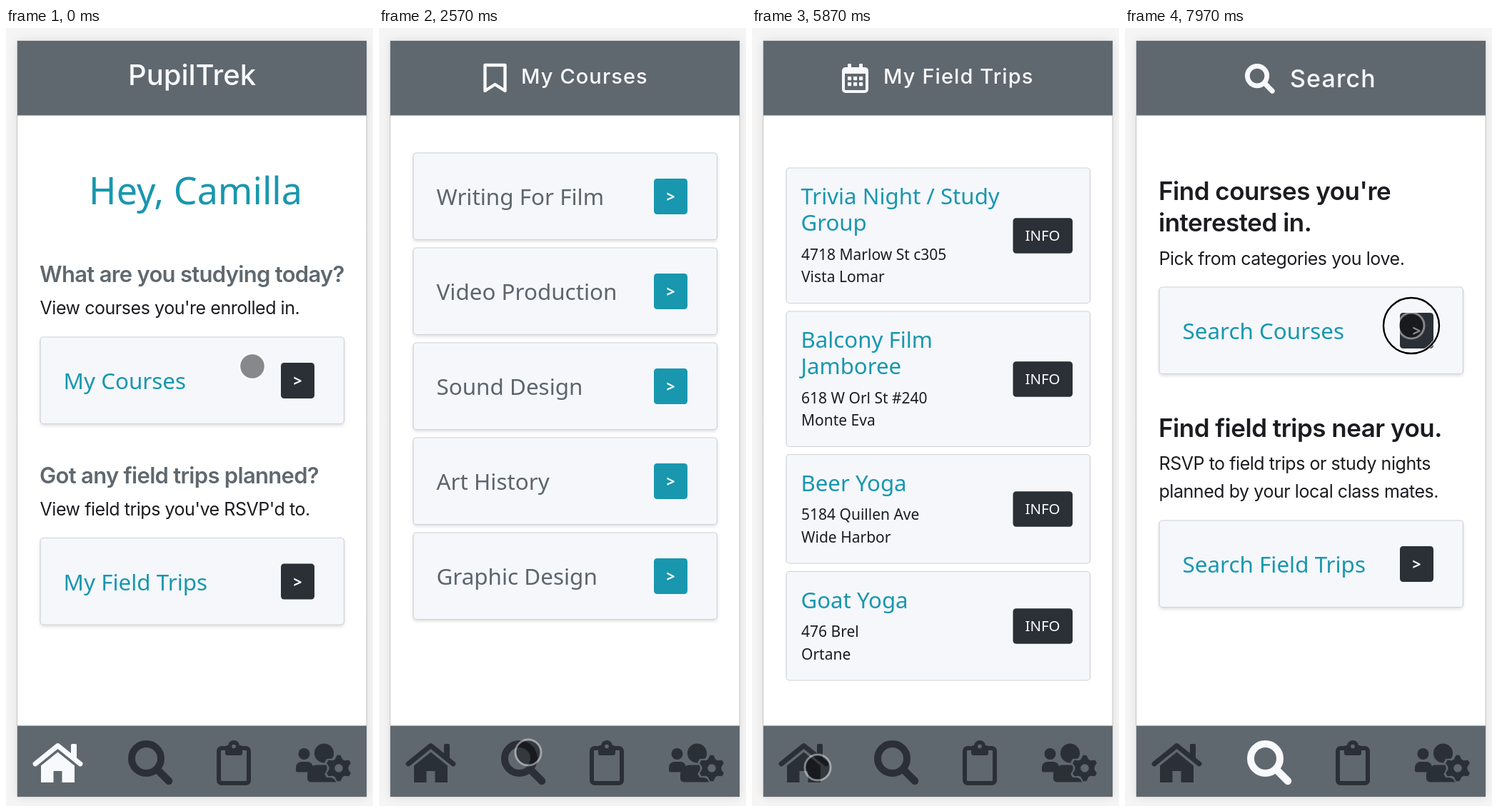
Animation, 514 px wide and 1090 px high, one loop 8000 ms. Source, as an HTML page with a canvas:

```html
<!DOCTYPE html>
<html lang="en">
<head>
<meta charset="utf-8">
<title>Field trip planner</title>
<style>
html, body { margin: 0; width: 100%; height: 100%; overflow: hidden; background: #f5f5f5; }
canvas { display: block; }
</style>
</head>
<body>
<canvas id="stage" width="514" height="1090"></canvas>
<script>
const ctx = document.getElementById('stage').getContext('2d');
const LOOP = 8000;
const BAR = '#60686f', DARK = '#2b3037', TEAL = '#1897ae', LIGHT = '#f7f9fc', INK = '#1b1c20';
const SANS = '"Noto Sans", "Open Sans", sans-serif';
const UI = 'Inter, Roboto, sans-serif';

// Drawing helpers

function text(str, x, y, font, color, align = 'left', spacing = 0) {
  ctx.font = font;
  ctx.fillStyle = color;
  ctx.textAlign = align;
  ctx.letterSpacing = spacing + 'px';
  ctx.fillText(str, x, y);
}

function fill(color) {
  ctx.fillStyle = color;
  ctx.fill();
}

function stroke(width, color) {
  ctx.lineWidth = width;
  ctx.strokeStyle = color;
  ctx.lineCap = ctx.lineJoin = 'round';
  ctx.stroke();
}

function rect(x, y, w, h, r) {
  ctx.beginPath();
  ctx.roundRect(x, y, w, h, r);
}

function box(x, y, w, h, r, color) {
  rect(x, y, w, h, r);
  fill(color);
}

function circle(x, y, r) {
  ctx.beginPath();
  ctx.arc(x, y, r, 0, Math.PI * 2);
}

function disc(x, y, r, color) {
  circle(x, y, r);
  fill(color);
}

function trace(...points) {
  ctx.beginPath();
  points.forEach(([x, y]) => ctx.lineTo(x, y));
}

// Icons

function magnifier(x, y, s, color) {
  circle(x + 25.5 * s, y + 25.5 * s, 20.5 * s);
  stroke(10 * s, color);
  trace([x + 43 * s, y + 43 * s], [x + 57 * s, y + 57 * s]);
  stroke(10.5 * s, color);
}

function house(color) {
  trace([41, 1031], [72.5, 1005.5], [104, 1031]);
  stroke(6.8, color);
  box(91, 1003, 8, 22, 1.5, color);
  trace([49, 1057], [49, 1033.5], [72.5, 1014.5], [96, 1033.5], [96, 1057],
        [78.5, 1057], [78.5, 1041], [66.5, 1041], [66.5, 1057]);
  fill(color);
}

function clipboard() {
  rect(298, 1009, 42, 49, 4);
  stroke(6, DARK);
  box(307, 1005, 24, 14, 3, DARK);
  disc(319, 1006, 8, DARK);
  disc(319, 1006.5, 2.8, BAR);
}

function cog(x, y, grow, color) {
  ctx.beginPath();
  for (let i = 0; i < 24; i++) {
    const a = (i + 1.5) * Math.PI / 12;
    const r = (i % 4 < 2 ? 18.3 : 13.6) + grow;
    ctx.lineTo(x + r * Math.cos(a), y + r * Math.sin(a));
  }
  fill(color);
}

function people() {
  disc(417.5, 1017, 8, DARK);
  box(406, 1028, 24, 14.5, [8, 8, 0, 2], DARK);
  box(425, 1029, 42, 30, [16, 16, 0, 0], BAR);
  disc(445.5, 1016, 13.6, DARK);
  box(422, 1032.5, 46, 24, [14, 14, 4, 5], DARK);
  cog(466, 1037, 3, BAR);
  cog(466, 1037, 0, DARK);
  disc(466, 1037, 5.8, BAR);
}

function bookmark() {
  trace([148.5, 52], [176.5, 52], [176.5, 88], [162.5, 79], [148.5, 88]);
  ctx.closePath();
  stroke(4.4, LIGHT);
}

function calendar() {
  rect(128, 57, 33, 32, 3);
  stroke(4, LIGHT);
  box(127, 56, 35, 8, 2, LIGHT);
  box(134, 50, 5, 9, 1, LIGHT);
  box(150, 50, 5, 9, 1, LIGHT);
  for (let i = 0; i < 6; i++) {
    box(134 + i % 3 * 8, 68 + (i > 2) * 8, 5.2, 5.2, 1, LIGHT);
  }
}

// Parts of a page

function card(y, h, shadow) {
  ctx.save();
  ctx.shadowColor = 'rgba(0,0,0,.14)';
  ctx.shadowBlur = shadow * 2;
  ctx.shadowOffsetY = shadow;
  box(48, y, 425.5, h, 4.5, '#f5f7fb');
  ctx.restore();
  stroke(1.2, '#cfd1d6');
}

function linkCard(y, label, color, button) {
  card(y, 121.5, 2.5);
  text(label, 80.5, y + 73, '31.4px ' + SANS, color);
  box(385, y + 36, 47, 50, 4.5, button);
  text('>', 408.5, y + 69, '600 21px ' + SANS, '#fff', 'center');
}

function tripCard(y, names, address, city) {
  const h = 115.5 + 37 * names.length, top = y + h / 2 - 24.5;
  card(y, h, 0);
  names.forEach((name, i) => text(name, 68.5, y + 51 + i * 37.3, '31.2px ' + SANS, TEAL));
  text(address, 69, y + h - 61, '21px ' + SANS, INK);
  text(city, 69, y + h - 29.5, '21px ' + SANS, INK);
  box(365.5, top, 83.5, 49.5, 4.5, DARK);
  text('INFO', 407, top + 32, '20.4px ' + SANS, '#fff', 'center');
}

const prompt = (str, y) => text(str, 47, y, '600 31px ' + UI, BAR, 'left', -0.7);
const heading = (str, y) => text(str, 47, y, '600 35px ' + UI, INK, 'left', -0.5);
const note = (str, y) => text(str, 47.5, y, '25px ' + UI, INK, 'left', -0.45);
const title = (str, x, y, size) => text(str, x, y, `500 ${size}px ${UI}`, LIGHT, 'left', 1.1);

function shell(active) {
  ctx.fillStyle = '#f5f5f5';
  ctx.fillRect(0, 0, 514, 1090);
  ctx.save();
  ctx.shadowColor = 'rgba(0,0,0,.1)';
  ctx.shadowBlur = 14;
  box(16, 18, 489, 1059, 0, '#fff');
  ctx.restore();
  stroke(1, '#c4c6c8');
  box(16, 18, 489, 104.5, 0, BAR);
  box(16, 977.5, 489, 99.5, 0, BAR);
  house(active === 'home' ? LIGHT : DARK);
  magnifier(171, 998, 1, active === 'search' ? LIGHT : DARK);
  clipboard();
  people();
}

// Pages

function home() {
  shell('home');
  text('PupilTrek', 260.5, 80, '500 40px ' + UI, LIGHT, 'center');
  text('Hey, Camilla', 265.5, 246.5, '52px ' + SANS, TEAL, 'center');
  prompt('What are you studying today?', 356);
  note("View courses you're enrolled in.", 401);
  linkCard(433, 'My Courses', TEAL, DARK);
  prompt('Got any field trips planned?', 637.5);
  note("View field trips you've RSVP'd to.", 682.5);
  linkCard(714.5, 'My Field Trips', TEAL, DARK);
}

function courses() {
  shell();
  bookmark();
  title('My Courses', 199, 78, 29);
  ['Writing For Film', 'Video Production', 'Sound Design', 'Art History', 'Graphic Design']
    .forEach((name, i) => linkCard(175 + i * 133, name, '#5d656c', TEAL));
}

function trips() {
  shell();
  calendar();
  title('My Field Trips', 184, 78, 29);
  tripCard(196, ['Trivia Night / Study', 'Group'], '4718 Marlow St c305', 'Vista Lomar');
  tripCard(397, ['Balcony Film', 'Jamboree'], '618 W Orl St #240', 'Monte Eva');
  tripCard(597.5, ['Beer Yoga'], '5184 Quillen Ave', 'Wide Harbor');
  tripCard(761.5, ['Goat Yoga'], '476 Brel', 'Ortane');
}

function search() {
  shell('search');
  magnifier(168, 50, 0.67, LIGHT);
  title('Search', 231, 83, 34);
  heading("Find courses you're", 241);
  heading('interested in.', 284.5);
  note('Pick from categories you love.', 331.5);
  linkCard(363, 'Search Courses', TEAL, DARK);
  heading('Find field trips near you.', 572.5);
  note('RSVP to field trips or study nights', 619);
  note('planned by your local class mates.', 658);
  linkCard(690, 'Search Field Trips', TEAL, DARK);
}

// Pointer script: glides to a point, loops over a list, clicks

const moves = [], clicks = [];
let rest = [345, 474];

function move(start, end, at) {
  moves.push({ start, end, at });
  rest = at(1);
}

function glide(start, end, x, y) {
  const [x0, y0] = rest;
  move(start, end, u => {
    const s = u * u * (3 - 2 * u);
    return [x0 + (x - x0) * s, y0 + (y - y0) * s];
  });
}

// Boxy ellipse; angles in half turns, the first offset fades out
function sweep(start, end, cx, cy, rx, ry, from, to) {
  const flat = v => Math.sin(1.2 * v) / Math.sin(1.2);
  const spot = u => {
    const a = (from + (to - from) * u) * Math.PI;
    return [cx + rx * flat(Math.cos(a)), cy - ry * flat(Math.sin(a))];
  };
  const first = spot(0), origin = rest;
  move(start, end, u => spot(u).map((v, k) => v + (origin[k] - first[k]) * (1 - u) ** 6));
}

function click(time, page) {
  clicks.push({ time, page, at: rest });
}

glide(0, 300, 402, 488);
click(320, courses);
sweep(720, 1170, 259, 559, 154, 195, 0, 1.55);
sweep(1330, 2130, 263, 477, 150, 352, -0.42, 1.38);
glide(2130, 2430, 209, 1015);
glide(2870, 3080, 77, 1046);
click(3090, home);
glide(3700, 4010, 422, 790);
click(4060, trips);
sweep(4530, 5330, 258, 585, 162, 337, -0.15, -1.58);
glide(5330, 5870, 92, 1036);
click(6180, home);
glide(6430, 6740, 200, 1038);
click(7040, search);
glide(7700, 7960, 401, 417);
click(7960, search);

function pointer(t) {
  const m = moves.findLast(m => m.start <= t);
  return m.at(Math.min(1, (t - m.start) / (m.end - m.start)));
}

function cursor(x, y) {
  disc(x, y, 17, 'rgba(0,0,0,.45)');
  circle(x, y, 18);
  stroke(3, 'rgba(255,255,255,.42)');
}

function ring(x, y) {
  circle(x, y, 39);
  stroke(4.5, 'rgba(255,255,255,.7)');
  stroke(2.4, '#000');
}

function draw(t) {
  const shown = clicks.findLast(c => c.time + 220 <= t);
  (shown ? shown.page : home)();
  cursor(...pointer(t));
  clicks.filter(c => t >= c.time && t < c.time + 200).forEach(c => ring(...c.at));
}

const begin = performance.now();
function tick() {
  draw((performance.now() - begin) % LOOP);
  requestAnimationFrame(tick);
}
tick();
</script>
</body>
</html>
```
